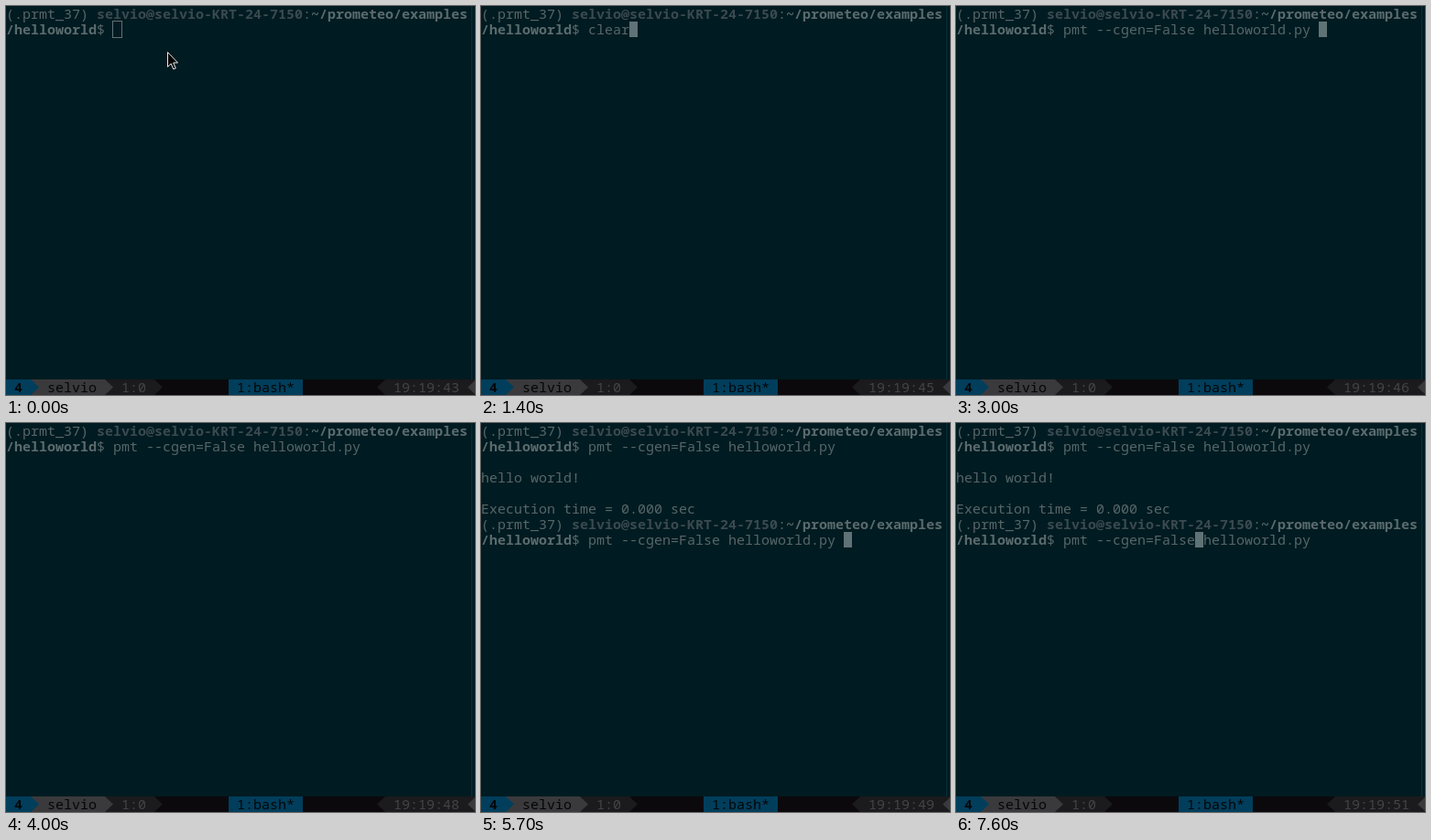
These frames come from a looping animation (512x425 px, 8000 ms). An HTML page with a canvas:

```html
<!DOCTYPE html>
<html lang="en">
<head>
<meta charset="utf-8">
<title>Terminal session</title>
<style>
  html, body { margin: 0; width: 100%; height: 100%; overflow: hidden; background: #001b21; }
  canvas { display: block; width: 512px; height: 425px; }
</style>
</head>
<body>
<canvas id="stage" width="512" height="425"></canvas>
<script>
const ctx = document.getElementById('stage').getContext('2d');
const LOOP = 8000, CW = 9, CH = 17, BASE = 14;
const FONT = '15px "Noto Sans Mono", "DejaVu Sans Mono", monospace';
const C = {
  bg: '#001b21', text: '#566769', user: '#3a4a50', path: '#5a6b6d', cursor: '#5f7376',
  rule: '#062e39', blue: '#003e5c', gray: '#3a3a3c', dark: '#1b1a1c', black: '#0b090c',
  dim: '#444446', ink: '#050607'
};
const USER = 'selvio';
const HOST = USER + '@' + USER + '-KRT-24-7150';
const command = flag => `pmt --cgen=${flag} helloworld.py `;

// Each list holds [start time, value]; the latest started value applies.
const clock = [[0, 43], [400, 44], [1000, 45], [2000, 46], [3400, 47], [4000, 48],
  [5000, 49], [6000, 50], [7400, 51]];
const firstLine = [[0, ''], [1400, 'clear'], [1800, command('True')], [2900, command('False')]];
const secondLine = [[0, ''], [5700, command('False')]];
const pointer = [[0, 'arrow'], [400, 'beam'], [1200, 'none']];
// Cursor column and row; null while blinked off.
const cursor = [[0, [13, 1]], [1400, [18, 1]], [1800, [43, 1]], [2400, null], [3000, [44, 1]],
  [3500, null], [4500, [13, 7]], [5300, null], [5700, [44, 7]], [6300, null], [6500, [44, 7]],
  [6900, [39, 7]], [7000, [34, 7]], [7400, [30, 7]], [7600, [29, 7]]];

function at(list, t) {
  let value = list[0][1];
  for (const [start, v] of list) if (t >= start) value = v;
  return value;
}

function rect(x, y, w, h, color) {
  ctx.fillStyle = color;
  ctx.fillRect(x, y, w, h);
}

function write(str, col, row, color, bold) {
  ctx.font = (bold ? 'bold ' : '') + FONT;
  ctx.fillStyle = color;
  [...str].forEach((ch, i) => ctx.fillText(ch, (col + i) * CW, row * CH + BASE));
}

function shape(points, fill, stroke) {
  ctx.beginPath();
  points.forEach(([x, y]) => ctx.lineTo(x, y));
  ctx.closePath();
  ctx.fillStyle = fill;
  ctx.fill();
  if (stroke) {
    ctx.strokeStyle = stroke;
    ctx.lineWidth = 1;
    ctx.stroke();
  }
}

function wedge(col, dir, color) {
  const x = col * CW, flat = dir > 0 ? x : x + CW;
  shape([[flat, 408], [flat + dir * CW, 416.5], [flat, 425]], color);
}

function prompt(row) {
  write('(.prmt_37) ', 0, row, C.text);
  write(HOST, 11, row, C.user, true);
  write(':', 36, row, C.text);
  write('~/prometeo/examples', 37, row, C.path, true);
  write('/helloworld', 0, row + 1, C.path, true);
  write('$', 11, row + 1, C.text);
}

function drawCursor(t, lines) {
  const pos = at(cursor, t);
  if (!pos) return;
  const [col, row] = pos, x = col * CW, y = row * CH;
  if (t < 800) {
    ctx.strokeStyle = C.cursor;
    ctx.lineWidth = 1;
    ctx.strokeRect(x - .5, y - .5, CW + 1, CH + 1);
    return;
  }
  rect(x, y, CW, CH, C.cursor);
  write(lines[row][col - 13] || ' ', col, row, C.bg);
}

function drawPointer(kind) {
  if (kind === 'arrow') {
    shape([[176.5, 50.5], [176.5, 66.5], [180.2, 63], [182.8, 69], [185.3, 68],
      [182.7, 62], [187.5, 62]], '#050505', '#e8e8e8');
  } else if (kind === 'beam') {
    rect(180, 51, 8, 3, '#e0e0e0');
    rect(180, 67, 8, 3, '#e0e0e0');
    rect(182.5, 52, 3, 17, '#e0e0e0');
    rect(181, 52, 6, 1, '#050505');
    rect(181, 68, 6, 1, '#050505');
    rect(183.5, 52, 1, 17, '#050505');
  }
}

function drawStatus(t) {
  rect(0, 408, 512, 17, C.black);
  rect(27, 408, 81, 17, C.gray);
  rect(108, 408, 54, 17, C.dark);
  rect(0, 408, 27, 17, C.blue);
  wedge(3, 1, C.blue);
  wedge(12, 1, C.gray);
  wedge(18, 1, C.dark);
  write('4', 1, 24, C.ink, true);
  write(USER, 5, 24, C.ink);
  write('1:0', 14, 24, C.dim);
  rect(243, 408, 81, 17, C.blue);
  write('1:bash*', 28, 24, C.ink);
  wedge(45, -1, C.dark);
  rect(414, 408, 98, 17, C.dark);
  write('19:19:' + at(clock, t), 47, 24, C.dim);
  wedge(56, -1, C.gray);
}

function draw(t) {
  rect(0, 0, 512, 425, C.bg);
  rect(508, 0, 1, 408, C.rule);
  const lines = { 1: at(firstLine, t), 7: at(secondLine, t) };
  prompt(0);
  write(lines[1], 13, 1, C.text);
  if (t >= 4400) {
    write('hello world!', 0, 3, C.text);
    write('Execution time = 0.000 sec', 0, 5, C.text);
  }
  if (t >= 4500) {
    prompt(6);
    write(lines[7], 13, 7, C.text);
  }
  drawCursor(t, lines);
  drawStatus(t);
  drawPointer(at(pointer, t));
}

const begin = performance.now();
function tick() {
  draw((performance.now() - begin) % LOOP);
  requestAnimationFrame(tick);
}
tick();
</script>
</body>
</html>
```
